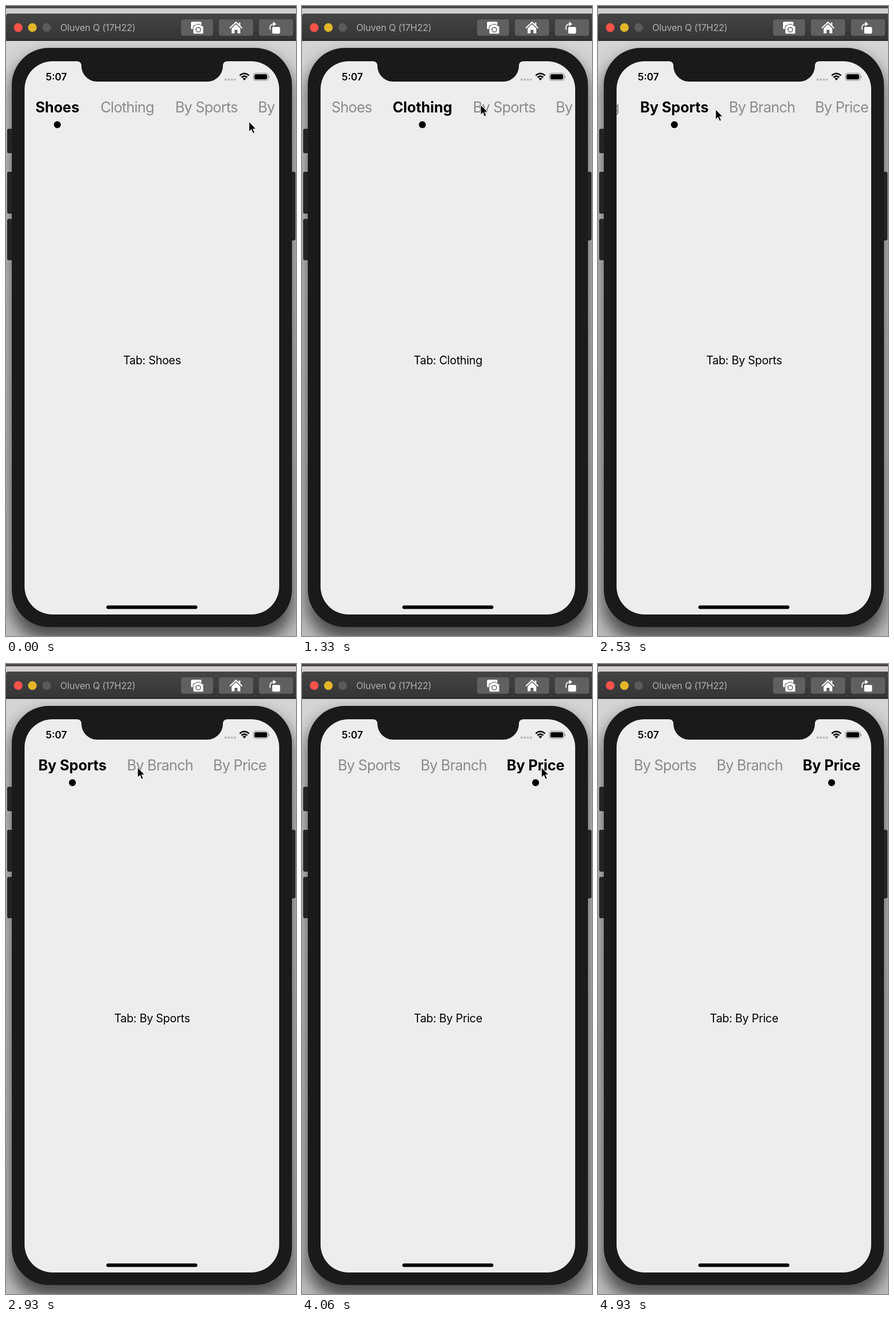
Write an HTML page that moves like this. It is 500 by 1083 pixels and loops after 5000 ms.

```html
<!DOCTYPE html>
<html lang="en">
<head>
<meta charset="utf-8">
<title>Scrolling tabs</title>
<style>
  html, body { margin: 0; height: 100%; overflow: hidden; background: #999; }
  svg { display: block; width: 100vw; height: 100vh; }
  text { font-family: Inter, Roboto, sans-serif; font-optical-sizing: none; }
  .tab { font-size: 25px; letter-spacing: -.031em; fill: #8b8b8b; text-anchor: middle; }
  .tab.on { font-weight: 700; letter-spacing: -.004em; fill: #000; }
  #label { font-size: 19.5px; letter-spacing: -.014em; text-anchor: middle; }
</style>
</head>
<body>
<svg viewBox="0 0 500 1083" preserveAspectRatio="none">
  <defs>
    <linearGradient id="desk" x2="0" y2="1">
      <stop stop-color="#d6d6d6"/><stop offset="1" stop-color="#bebebe"/>
    </linearGradient>
    <linearGradient id="bar" x2="0" y2="1">
      <stop stop-color="#454545"/><stop offset="1" stop-color="#343434"/>
    </linearGradient>
    <filter id="blur" x="-20%" y="-20%" width="140%" height="140%"><feGaussianBlur stdDeviation="14"/></filter>
    <clipPath id="screen"><rect x="32" y="95" width="439" height="951" rx="48"/></clipPath>
  </defs>

  <!-- desktop and window bar -->
  <rect width="500" height="1083" fill="url(#desk)"/>
  <rect x="8" y="86" width="487" height="1004" rx="64" fill="#000" opacity=".6" filter="url(#blur)"/>
  <rect width="500" height="14" fill="#d0ced0"/>
  <rect width="500" height="4" fill="#4b474a"/>
  <path d="M0 59V17Q0 13 4 13H500V59Z" fill="url(#bar)"/>
  <rect y="58.5" width="500" height="1.5" fill="#222"/>
  <circle cx="21" cy="37" r="7.5" fill="#ff5149"/>
  <circle cx="45.5" cy="37" r="7.5" fill="#e4b72b"/>
  <circle cx="70" cy="37" r="7.5" fill="#5a5a5a"/>
  <text x="93.5" y="43" font-size="16" letter-spacing="-.2" fill="#b0b0b0">Oluven Q (17H22)</text>
  <g fill="#606060">
    <rect x="302" y="23" width="55" height="28" rx="4"/>
    <rect x="367" y="23" width="59" height="28" rx="4"/>
    <rect x="436" y="23" width="59" height="28" rx="4"/>
  </g>
  <g fill="#fff">
    <rect x="319" y="27" width="18" height="13" rx="2"/>
    <path d="M323.500 34H326L328 31.500H335L337 34H338.500Q340.500 34 340.500 36V46Q340.500 48 338.500 48H324.500Q322.500 48 322.500 46V36Q322.500 34 324.500 34Z" stroke="#606060"/>
    <circle cx="331.500" cy="40.700" r="4" stroke="#606060" stroke-width="1.500"/>
    <path d="M386 38L396.500 28L407 38" fill="none" stroke="#fff" stroke-width="2"/>
    <path d="M389 38.500L396.500 31.500L404 38.500V47H399V41H394V47H389Z M401.500 28.500H404V34L401.500 32Z"/>
    <rect x="459" y="36" width="13.500" height="11.500" rx="2"/>
    <path d="M455.500 41Q453.500 31 462 31" fill="none" stroke="#fff" stroke-width="1.600"/>
    <path d="M460.500 27L466 31L460.500 35Z"/>
  </g>

  <!-- phone -->
  <g fill="#242424">
    <rect x="2" y="211" width="12" height="42" rx="3"/>
    <rect x="2" y="285" width="12" height="72" rx="3"/>
    <rect x="2" y="366" width="12" height="71" rx="3"/>
    <rect x="488" y="285" width="11" height="118" rx="3"/>
  </g>
  <rect x="10" y="72" width="483" height="995.500" rx="64" fill="#1a1a1a"/>
  <rect x="32" y="95" width="439" height="951" rx="48" fill="#ededed"/>
  <path d="M122 94V95Q130 95 130 103A27 27 0 0 0 157 130H347A27 27 0 0 0 374 103Q374 95 382 95V94Z" fill="#1a1a1a"/>
  <text x="68.500" y="128" font-size="17" font-weight="600">5:07</text>
  <g fill="#bcbcbc">
    <circle cx="378.500" cy="126.500" r="2"/><circle cx="383.800" cy="126.500" r="2"/>
    <circle cx="389.200" cy="126.500" r="2"/><circle cx="394.500" cy="126.500" r="2"/>
  </g>
  <g fill="none" stroke="#000" stroke-width="2.500">
    <path d="M403 119.500Q411 112.500 419 119.500M406 122.800Q411 118.500 416 122.800"/>
    <path d="M408 124.500Q411 122.500 414 124.500L411 128Z" fill="#000" stroke="none"/>
  </g>
  <rect x="426.500" y="115.500" width="25.500" height="12.500" rx="3.500" fill="none" stroke="#8c8c8c"/>
  <rect x="428.300" y="117.300" width="21.900" height="9" rx="2"/>
  <path d="M453 119.500Q455.500 121.800 453 124Z" fill="#777"/>
  <rect x="173" y="1030.500" width="157" height="6" rx="3"/>

  <g clip-path="url(#screen)"><g id="tabs"></g></g>
  <text id="label" x="251.800" y="615.500"></text>
  <path id="cursor" d="M0 0V17L4 13.300L6.800 20L9.600 18.800L6.800 12.300H12Z" stroke="#fff" stroke-width=".9"/>
</svg>

<script>
const LOOP = 5000, GAP = 36, LEFT = 51;
// width: plain and selected slot; at: time of the tap; scroll: strip offset once settled
const tabs = [
  { name: 'Shoes',     width: [69, 75],    at: 0,    scroll: 0 },
  { name: 'Clothing',  width: [94, 103],   at: 800,  scroll: 0 },
  { name: 'By Sports', width: [107, 117],  at: 1750, scroll: 230 },
  { name: 'By Branch', width: [113, 122],  at: 3100, scroll: 229 },
  { name: 'By Price',  width: [90, 97.5],  at: 3800, scroll: 224 }
];
const DRAG = [2230, 2750], CURSOR_GONE = 4500;
const path = [ // time, x, y of the pointer tip
  [0, 419, 199], [80, 419, 199], [540, 209, 160], [950, 209, 160],
  [1330, 308, 170], [1600, 353, 176], [2200, 353, 176], [2600, 190, 178],
  [2900, 227, 178], [3200, 227, 178], [3650, 413, 178], [LOOP, 413, 178]
];

const $ = id => document.getElementById(id);
const clamp = v => Math.min(1, Math.max(0, v));
const smooth = p => p * p * (3 - 2 * p);
const add = (tag, attrs) => {
  const el = document.createElementNS('http://www.w3.org/2000/svg', tag);
  for (const k in attrs) el.setAttribute(k, attrs[k]);
  return $('tabs').appendChild(el);
};

for (const tab of tabs) {
  tab.el = add('text', { y: 183 });
  tab.el.textContent = tab.name;
}
const dot = add('circle', { cy: 204, r: 6 });

function pointer(t) {
  const i = path.findIndex(k => k[0] > t);
  const [t0, x0, y0] = path[i - 1], [t1, x1, y1] = path[i];
  const p = smooth((t - t0) / (t1 - t0));
  return [x0 + (x1 - x0) * p, y0 + (y1 - y0) * p];
}

function draw(t) {
  const active = tabs.findLast(tab => t >= tab.at);
  const drag = 1 - (1 - clamp((t - DRAG[0]) / (DRAG[1] - DRAG[0]))) ** 3;
  let x = LEFT - active.scroll * drag;
  for (const tab of tabs) {
    const on = tab === active, w = tab.width[+on];
    tab.el.setAttribute('class', on ? 'tab on' : 'tab');
    tab.el.setAttribute('x', x + w / 2);
    if (on) dot.setAttribute('cx', x + w / 2);
    x += w + GAP;
  }
  $('label').textContent = 'Tab: ' + active.name;
  $('cursor').setAttribute('transform', `translate(${pointer(t)})`);
  $('cursor').style.display = t < CURSOR_GONE ? '' : 'none';
}

const start = performance.now();
(function frame() {
  draw((performance.now() - start) % LOOP);
  requestAnimationFrame(frame);
})();
</script>
</body>
</html>
```
